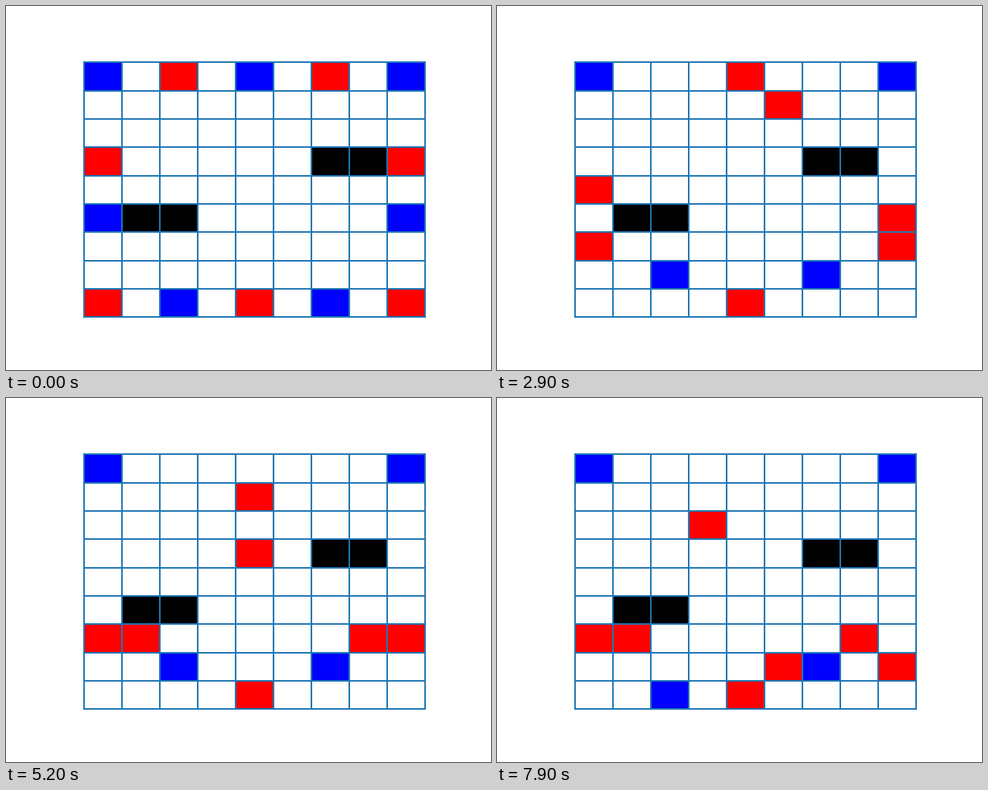
Animation of 640x480 px, one loop 8000 ms. Source, as a matplotlib script:

```python
import numpy as np
import matplotlib.pyplot as plt
from matplotlib.animation import FuncAnimation
from matplotlib.colors import ListedColormap

SIZE = 9
STEPS = 80
EMPTY, RED, BLUE, WALL = range(4)
DIRS = {"L": (-1, 0), "R": (1, 0), "U": (0, -1), "D": (0, 1)}

# (column, row), counted from the top left
REDS = [(2, 0), (6, 0), (0, 3), (8, 3), (0, 8), (4, 8), (8, 8)]
BLUES = [(0, 0), (4, 0), (8, 0), (0, 5), (8, 5), (2, 8), (6, 8)]
WALLS = [(6, 3), (7, 3), (1, 5), (2, 5)]

# Red's play: piece index and the steps it takes, one per turn
RED_PLAY = [
    (0, "R"), (1, "L"), (3, "D"), (6, "UU"), (3, "D"), (2, "D"), (4, "U"),
    (0, "R"), (6, "LR"), (1, "D"), (6, "LR"), (4, "U"), (0, "LD"), (2, "D"),
    (4, "R"), (2, "D"), (1, "LD"), (0, "R"), (1, "D"), (6, "L"), (3, "D"),
    (4, "DU"), (0, "L"), (1, "D"), (3, "D"), (1, "D"), (6, "R"), (0, "D"),
    (6, "LR"), (1, "DDR"), (6, "L"),
]


def shift(pos, d):
    dx, dy = DIRS[d]
    return pos[0] + dx, pos[1] + dy


def trapped(pos, foes):
    """A piece is taken when foes stand on two opposite sides."""
    return any(shift(pos, a) in foes and shift(pos, b) in foes
               for a, b in ("LR", "UD"))


def snapshot(reds, blues):
    grid = np.full((SIZE, SIZE), EMPTY)
    for kind, cells in ((WALL, WALLS), (BLUE, blues.values()), (RED, reds)):
        for x, y in cells:
            grid[y, x] = kind
    return grid


def play():
    reds, blues = list(REDS), dict(enumerate(BLUES))
    red_moves = iter([(i, d) for i, path in RED_PLAY for d in path])
    boards = [snapshot(reds, blues)]
    for step in range(1, STEPS):
        if step % 2:
            i, d = next(red_moves)
            reds[i] = shift(reds[i], d)
            blues = {k: p for k, p in blues.items() if not trapped(p, reds)}
        elif step == 2:
            blues[6] = shift(blues[6], "U")
        else:
            # blue passes time by stepping up and down
            blues[5] = shift(blues[5], "U" if blues[5][1] == 8 else "D")
        boards.append(snapshot(reds, blues))
    return boards


boards = play()

fig, ax = plt.subplots(figsize=(6.4, 4.8), dpi=100)
fig.subplots_adjust(left=0.125, right=0.9, bottom=0.11, top=0.88)
ax.axis("off")

edges = np.arange(SIZE + 1)
mesh = ax.pcolormesh(edges, edges, boards[0], vmin=0, vmax=3, zorder=1,
                     cmap=ListedColormap(["white", "red", "blue", "black"]))
for k in edges:
    ax.plot([0, SIZE], [k, k], color="C0", lw=1.5, zorder=2)
    ax.plot([k, k], [0, SIZE], color="C0", lw=1.5, zorder=2)

pad = 0.05 * SIZE
ax.set_xlim(-pad, SIZE + pad)
ax.set_ylim(SIZE + pad, -pad)


def update(i):
    mesh.set_array(boards[i])
    return [mesh]


anim = FuncAnimation(fig, update, frames=STEPS, interval=100,
                     repeat=True, repeat_delay=0, blit=False)
plt.show()
```
